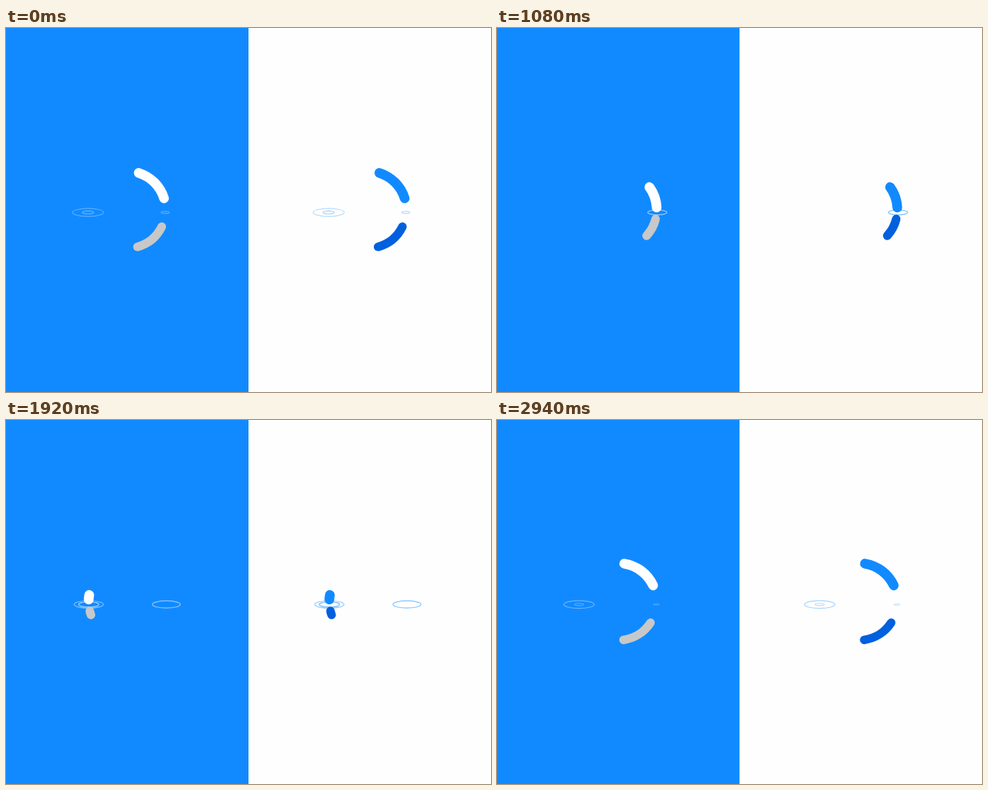
An HTML page with a canvas for the animation above (2970 ms loop, 658 px wide and 494 px high).

```html
<!DOCTYPE html>
<html lang="en">
<head>
<meta charset="utf-8">
<title>Loader over water</title>
<style>
  html, body { margin: 0; width: 100%; height: 100%; overflow: hidden; background: #fefefe; }
  canvas { display: block; }
</style>
</head>
<body>
<canvas id="stage" width="658" height="494"></canvas>
<script>
const ctx = document.getElementById('stage').getContext('2d');
const LOOP = 2970, STEP = 30, RAD = Math.PI / 180;
const CX = 164.4, CY = 246.6, R = 52.3, WATER = 250.3;

const PANELS = [
  { dx: 0, arc: '#ffffff', mirror: '#c8c8c8', ring: '#ffffff' },
  { dx: 326.5, arc: '#128aff', mirror: '#0060de', ring: '#128aff' }
];

// Each trip: middle times of the leading and trailing ends
const TRIPS = [
  { head: 1282, tail: 1478, dir: -1 },
  { head: 2735, tail: 2913, dir: 1 }
];

// Ripples: centre x, start times
const RIPPLES = [
  [216, [2865, 3090]],
  [217.5, [820, 1120, 1490]],
  [112.3, [1455, 1640]],
  [111.3, [2250, 2435, 2825]]
];
const RING_LIFE = 640, RING_R = 21.8;

// Leading end: ms from the middle, share of the path
const EASE = [
  [-575, 0], [-515, .018], [-350, .075], [-200, .19], [-35, .434],
  [0, .5], [205, .875], [235, .92], [300, .985], [340, 1]
];

const mod = (a, n) => ((a % n) + n) % n;

function slope(i) {
  if (i === 0 || i === EASE.length - 1) return 0;
  const [a, b] = [EASE[i - 1], EASE[i + 1]];
  return (b[1] - a[1]) / (b[0] - a[0]);
}

function ease(t) {
  if (t <= EASE[0][0]) return 0;
  const i = EASE.findIndex(p => p[0] > t) - 1;
  if (i < 0) return 1;
  const [x0, y0] = EASE[i], [x1, y1] = EASE[i + 1];
  const w = x1 - x0, u = (t - x0) / w, v = 1 - u;
  return v * v * (1 + 2 * u) * y0 + u * u * (3 - 2 * u) * y1 +
    w * u * v * (v * slope(i) - u * slope(i + 1));
}

// Draws part a..b of a half circle; side -1 is above the water, 1 below
function drawArc(p, a, b, dir, side, inset, width, color) {
  const angle = f => {
    const deg = inset + f * (180 - 2 * inset);
    return side * (dir > 0 ? 180 - deg : deg) * RAD;
  };
  const from = angle(a), to = angle(b);
  ctx.beginPath();
  ctx.arc(CX + p.dx, CY, R, Math.min(from, to), Math.max(from, to));
  ctx.lineWidth = width;
  ctx.strokeStyle = color;
  ctx.stroke();
}

function drawRing(p, x, age) {
  const u = age / RING_LIFE;
  if (u <= 0 || u >= 1) return;
  const r = RING_R * Math.sin(u * Math.PI / 2);
  ctx.globalAlpha = .6 * Math.sin(u * Math.PI);
  ctx.beginPath();
  ctx.ellipse(x + p.dx, WATER, r, r * .255, 0, 0, 2 * Math.PI);
  ctx.lineWidth = 1.2;
  ctx.strokeStyle = p.ring;
  ctx.stroke();
  ctx.globalAlpha = 1;
}

function draw(t) {
  ctx.fillStyle = '#fefefe';
  ctx.fillRect(0, 0, 658, 494);
  ctx.fillStyle = '#128aff';
  ctx.fillRect(0, 0, 329, 494);
  ctx.lineCap = 'round';
  for (const p of PANELS) {
    for (const [x, starts] of RIPPLES)
      for (const s of starts) drawRing(p, x, mod(t - s, LOOP));
    for (const trip of TRIPS) {
      const begin = trip.head - 600;
      const now = begin + mod(t - begin, LOOP);
      const a = 1 - ease(trip.tail - now), b = ease(now - trip.head);
      if (b - a < .001) continue;
      drawArc(p, a, b, trip.dir, 1, 14, 11.6, p.mirror);
      drawArc(p, a, b, trip.dir, -1, 3.3, 13.2, p.arc);
    }
  }
}

const t0 = performance.now();
function frame() {
  const t = (performance.now() - t0) % LOOP;
  draw(Math.floor(t / STEP) * STEP);
  requestAnimationFrame(frame);
}
frame();
</script>
</body>
</html>
```
